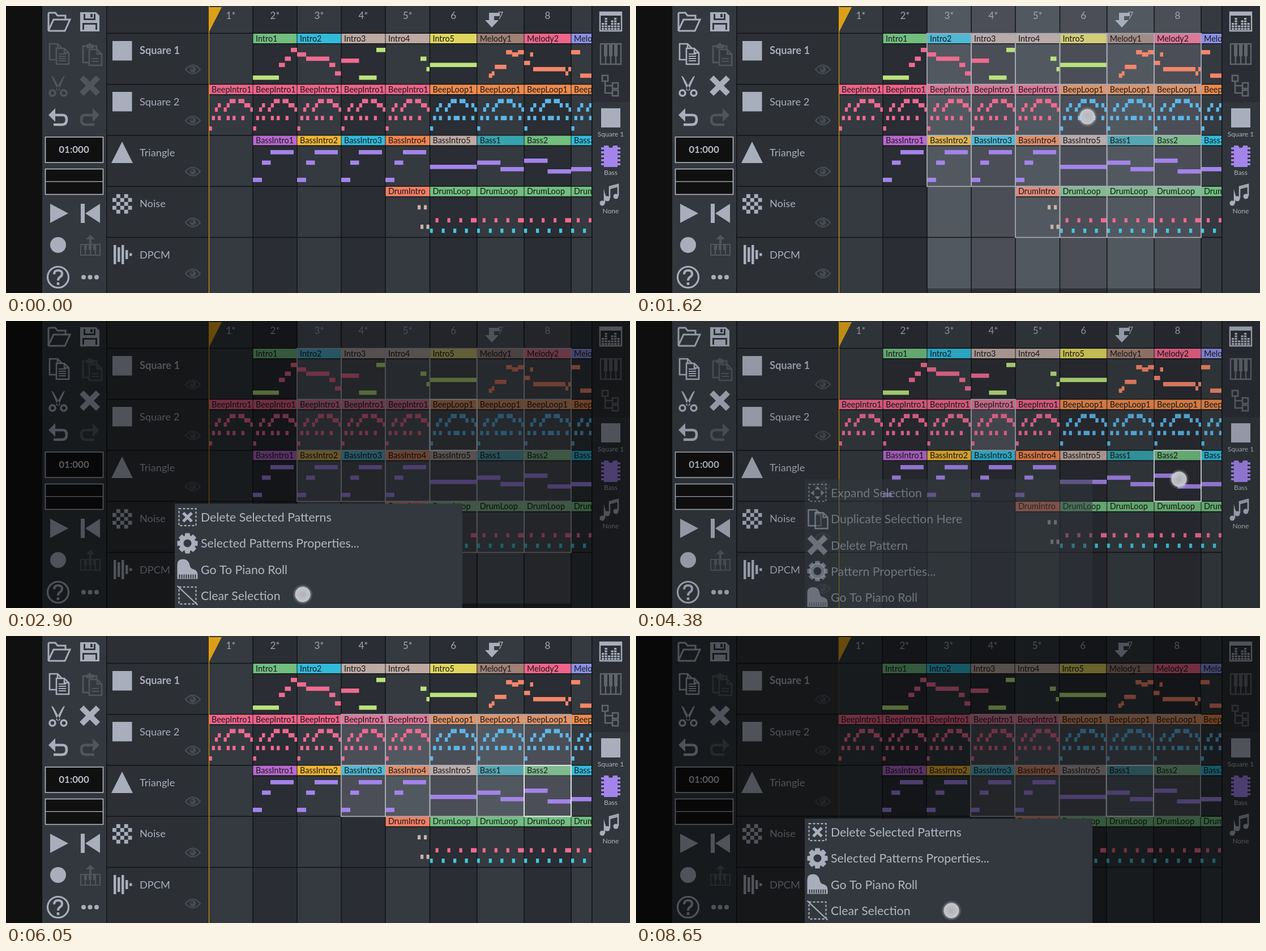
Animation, 1102 px wide and 508 px high, one loop 8720 ms. Source, as an HTML page with a canvas:

```html
<!DOCTYPE html>
<html lang="en">
<head>
<meta charset="utf-8">
<title>Pattern selection</title>
<style>
html, body { margin: 0; width: 100%; height: 100%; overflow: hidden; background: #101010; }
canvas { display: block; width: 1102px; height: 508px; }
</style>
</head>
<body>
<canvas id="stage" width="1102" height="508"></canvas>
<script>
const g = document.getElementById('stage').getContext('2d');
const LOOP = 8720, LIGHT = '#a9aebc', OFF = '#50555c', PANEL = '#32383e', LINE = '#111316';
const GREEN = '#71be7f', CYAN = '#31bbdb', MAUVE = '#bca9a1', ROSE = '#ef648a', ORANGE = '#ef8a4c';
const PINK = '#f06a91', LIME = '#b9e27c', CORAL = '#f4866a', BLUE = '#5ab8ec', PURPLE = '#a384ea';

const colX = [358, 436, 514, 592, 670, 748.5, 831.7, 915, 998, 1081];
const rowY = r => 48.3 + r * 90.3;
const clamp = v => Math.max(0, Math.min(1, v));
const smooth = v => v * v * (3 - 2 * v);

function rect(x, y, w, h, color) { g.fillStyle = color; g.fillRect(x, y, w, h); }
function fill(path, color) { g.fillStyle = color; g.fill(new Path2D(path)); }
function stroke(path, color, width = 2) { g.strokeStyle = color; g.lineWidth = width; g.stroke(new Path2D(path)); }
function disc(x, y, r, color) { g.fillStyle = color; g.beginPath(); g.arc(x, y, r, 0, 7); g.fill(); }
function text(s, x, y, size, color, weight = 400, align = 'left') {
  g.font = `${weight} ${size}px Lato, "Open Sans", sans-serif`;
  g.textAlign = align;
  g.textBaseline = 'alphabetic';
  g.fillStyle = color;
  g.fillText(s, x, y);
}
function at(x, y, draw) { g.save(); g.translate(x, y); draw(); g.restore(); }

// Notes are triples: x offset in the pattern, y on stage, width.
const beep = (lows, tail) => [
  [0, 213], ...lows.map(i => [i, 194.5]), [2, 179.5], [3, 172], [5, 179.5], [6, 172],
  [7, 164.5], [8, 164.5], [10, 164.5], [11, 164.5], [12, 172], [tail, 172], [tail + 1, 179.5],
].flatMap(([i, y]) => [i * 5.2 + .5, y, 5.3]);
const introBeep = ['BeepIntro1', ROSE, [PINK, beep([1, 3, 6, 8, 11], 13)]];
const loopBeep = ['BeepLoop1', ORANGE, [BLUE, beep([1, 3, 6, 8, 9, 11, 14], 14)]];
const introBass = (n, color) => ['BassIntro' + n, color, [PURPLE, [0, 304, 16, 16, 273.5, 15.5, 31, 255, 41]]];
const drums = ['DrumLoop', GREEN,
  [PINK, [10, 375.5, 5.2, 31, 375.5, 5.2, 52, 375.5, 5.2, 72.5, 375.5, 10.5]],
  ['#40c8e0', [0, 394, 5.2, 21, 394, 5.2, 41.5, 394, 5.2, 62, 394, 5.2]]];
const tracks = [
  ['Square 1', [null,
    ['Intro1', GREEN, [LIME, [0, 123, 46]], [PINK, [46, 100.5, 10.5, 56.5, 89.5, 10.5, 67, 74, 11]]],
    ['Intro2', CYAN, [PINK, [0, 82, 16, 16, 89.5, 41, 57, 100.5, 10.5, 67, 115.5, 10.5]]],
    ['Intro3', MAUVE, [PINK, [0, 93, 31.5]], [LIME, [31.5, 123, 31, 62, 74, 16]]],
    ['Intro4', MAUVE, [LIME, [62, 89.5, 10.5, 72.5, 108, 5.5]]],
    ['Intro5', '#e0d65e', [LIME, [0, 100.5, 83]]],
    ['Melody1', '#9f8075', [CORAL, [21, 119.5, 6, 26, 115.5, 5, 31.5, 104, 20.5, 51.5, 78, 10.5, 62, 82, 11, 72.5, 78, 10.5]]],
    ['Melody2', ROSE, [CORAL, [0, 97, 10.5, 10.5, 82, 5.5, 16, 108, 57, 73, 115.5, 5, 78, 108, 5]]],
    ['Melody3', '#8c90e6', [CORAL, [0, 78, 16, 16, 119.5, 40]]]]],
  ['Square 2', [...Array(5).fill(introBeep), ...Array(4).fill(loopBeep)]],
  ['Triangle', [null, introBass(1, '#b968d0'), introBass(2, '#efb532'), introBass(3, CYAN), introBass(4, '#f0844f'),
    ['BassIntro5', MAUVE, [PURPLE, [0, 281, 83]]],
    ['Bass1', '#38a3ad', [PURPLE, [0, 273.5, 41.5, 41.5, 285, 41.5]]],
    ['Bass2', GREEN, [PURPLE, [0, 270, 41.5, 41.5, 289, 41.5]]],
    ['Bass3', CYAN, [PURPLE, [0, 285, 60]]]]],
  ['Noise', [null, null, null, null,
    ['DrumIntro', '#ef7d62', ['#c8b3aa', [57, 352.5, 5.2, 68, 352.5, 5.2, 62, 387, 5.2, 72.5, 387, 5.2]]],
    drums, drums, drums, drums]],
  ['DPCM', []],
];

const cross = 'M-11 -18L0 -7 11 -18 18 -11 7 0 18 11 11 18 0 7 -11 18 -18 11 -7 0 -18 -11Z';
const piano = 'M-18 17V-8Q-18 -18 -8 -18Q2 -18 4 -7Q5 -1 11 0Q18 2 18 10V17Z';
const dashed = () => { g.setLineDash([4, 3]); stroke('M-15 -15H15V15H-15Z', LIGHT, 2.2); g.setLineDash([]); };
function page(x, y, color, back) {
  at(x, y, () => {
    fill('M-9 -13H5L13 -5V15H-9Z', back);
    stroke('M-9 -13H5L13 -5V15H-9ZM5 -13V-5H13', color, 2.6);
  });
}
function gear() {
  g.save();
  for (let i = 0; i < 8; i++) { fill('M-5 -12L-4 -18H4L5 -12Z', LIGHT); g.rotate(Math.PI / 4); }
  g.restore();
  g.strokeStyle = LIGHT; g.lineWidth = 7;
  g.beginPath(); g.arc(0, 0, 10.5, 0, 7); g.stroke();
}
const menuIcons = {
  'Expand Selection': () => {
    dashed();
    for (let i = 0; i < 4; i++) { fill('M0 -12L5 -6H-5Z', LIGHT); g.rotate(Math.PI / 2); }
  },
  'Duplicate Selection Here': () => { page(-7, -3, LIGHT, PANEL); page(5, 2, LIGHT, PANEL); },
  'Delete Pattern': () => fill(cross, LIGHT),
  'Pattern Properties...': gear,
  'Delete Selected Patterns': () => { dashed(); g.scale(.52, .52); fill(cross, LIGHT); },
  'Selected Patterns Properties...': gear,
  'Go To Piano Roll': () => {
    fill(piano, LIGHT);
    for (let x = -15; x < 17; x += 4) rect(x, 9, 2, 7, PANEL);
  },
  'Clear Selection': () => { dashed(); stroke('M-18 -17L18 17', LIGHT, 2.2); },
};
const groupItems = ['Delete Selected Patterns', 'Selected Patterns Properties...', 'Go To Piano Roll', 'Clear Selection'];
const cellItems = ['Expand Selection', 'Duplicate Selection Here', 'Delete Pattern', 'Pattern Properties...', 'Go To Piano Roll', 'Clear Selection'];

// Each menu: opening time, closing start and end, items.
const menus = [
  [2100, 3000, 3100, groupItems],
  [4265, 5920, 6050, cellItems],
  [7930, 9000, 9100, groupItems],
];
// Each touch: down, gone, x, y.
const touches = [
  [70, 1090, 553, 18], [1620, 2370, 797, 196], [2770, 3030, 524, 484], [3500, 3700, 630, 185],
  [3900, 4720, 959, 280], [5780, 5980, 540, 256], [7440, 8390, 888, 271], [8640, 8900, 557, 486],
];
const dragX = t => 553 + 404 * clamp((t - 70) / 820);

function selectionAt(t) {
  if (t < 90 || (t >= 3000 && t < 3700)) return null;
  if (t < 3000) return { c0: 2, c1: colX.findIndex(x => x > dragX(t)) - 1, r0: 0, r1: 4, full: true };
  return { c0: 3, c1: t < 5920 ? 3 : 7, r0: 1, r1: t < 5920 ? 1 : 2 };
}
function focusAt(t) {
  if (t >= 7930) return [6, 2];
  if (t >= 4265) return [7, 2];
  return t >= 2100 && t < 3000 ? [5, 1] : null;
}

function outline(c, r, color) {
  g.strokeStyle = color; g.lineWidth = 1.8;
  g.strokeRect(colX[c], rowY(r) + .2, colX[c + 1] - colX[c], 90.2);
}

function drawGrid(t) {
  const sel = selectionAt(t), focus = focusAt(t), veil = 'rgba(170,175,192,.25)';
  const selected = (c, r) => sel && c >= sel.c0 && c <= sel.c1 && r >= sel.r0 && r <= sel.r1;
  g.save();
  g.beginPath(); g.rect(357.5, 0, 676.5, 508); g.clip();
  g.translate(t >= 7930 ? -1 : 0, 0);
  for (let c = 0; c < 9; c++) {
    const x = colX[c], w = colX[c + 1] - x;
    rect(x, 0, w + 1, 508, c % 2 ? '#2a2d33' : '#343a3f');
    if (sel && sel.full && c >= sel.c0 && c <= sel.c1) rect(x, 0, w, 500, veil);
    if (c < 8) text(c + 1 + (c < 5 ? '*' : ''), x + w / 2, 23, 17, '#a0a5b1', 400, 'center');
  }
  colX.forEach(x => rect(x - .7, 0, 1.5, 508, LINE));
  for (let r = 0; r < 5; r++) rect(358, rowY(r) - .7, 680, 1.5, LINE);

  tracks.forEach(([, patterns], r) => patterns.forEach((p, c) => {
    if (!p) return;
    const x = colX[c], y = rowY(r), w = colX[c + 1] - x;
    rect(x + .5, y + .7, w - 1, 17, p[1]);
    rect(x, y + 17.7, w, 1.4, LINE);
    if (selected(c, r)) rect(x, y, w, sel.full ? 18 : 90, veil);
    g.save();
    g.beginPath(); g.rect(x, y, w, 90); g.clip();
    text(p[0], x + 5, y + 14.2, 14.4, '#17191c');
    for (const [color, notes] of p.slice(2))
      for (let i = 0; i < notes.length; i += 3) rect(x + notes[i], notes[i + 1], notes[i + 2], 7.6, color);
    g.restore();
  }));
  tracks.forEach(([, patterns], r) => patterns.forEach((p, c) => {
    if (p && selected(c, r)) outline(c, r, '#a9acb7');
  }));
  if (focus) outline(...focus, '#e8e9ec');

  fill('M872 12H853V25H846L858 38 870 25H862V18H872Z', LIGHT);
  rect(357.5, 0, 1.6, 508, '#dda018');
  fill('M358 2H381L358 47Z', '#dca018');
  g.restore();
}

function drawTracks() {
  rect(178, 0, 179.5, 508, '#2c3035');
  tracks.forEach(([name], r) => {
    const y = rowY(r);
    rect(178, y - .7, 179.5, 1.5, LINE);
    text(name, 236, y + 37, 18.2, LIGHT, r ? 400 : 700);
    at(330, y + 64, () => {
      stroke('M-13 0Q0 -15 13 0Q0 15 -13 0Z', '#464b51', 2.4);
      disc(0, 0, 5.5, '#464b51');
      disc(-1.5, -1.5, 2, '#2c3035');
    });
  });
  rect(188, 62, 34.5, 34.5, LIGHT);
  rect(188, 152, 34.5, 34.5, LIGHT);
  fill('M205 240L224 278H186Z', LIGHT);
  for (let i = 1; i < 25; i += 2) rect(188 + i % 5 * 6.9, 333 + Math.floor(i / 5) * 6.9, 6.9, 6.9, LIGHT);
  [34, 26, 34, 16, 5].forEach((h, i) => rect(190 + i * 7, 440 - h / 2, 4.5, h, LIGHT));
}

function drawToolbar(enabled) {
  const active = enabled ? LIGHT : OFF;
  rect(64, 0, 113, 508, PANEL);
  rect(177, 0, 1.5, 508, LINE);
  at(93, 28, () => {
    stroke('M-18 15V-14Q-18 -16 -16 -16H-6L-2 -11H12V-4', LIGHT, 3);
    stroke('M-18 15L-9 -4H20L11 16H-17Z', LIGHT, 3);
  });
  at(148, 28, () => {
    fill('M-17 -17H11L17 -11V17H-17Z', LIGHT);
    rect(-11, -14, 21, 11, PANEL); rect(-8, -17, 15, 11, LIGHT); rect(1, -14, 4, 6, PANEL);
    rect(-13, 2, 26, 12, PANEL); rect(-10, 5, 20, 12, LIGHT);
  });
  page(86, 80, active, PANEL);
  page(98, 88, active, PANEL);
  for (let i = 0; i < 4; i++) rect(93, 84 + i * 4, 13, 2, active);
  at(150, 85, () => {
    stroke('M-14 -14H10V15H-14Z', OFF, 3);
    fill('M-8 -17H-5Q-2 -23 1 -17H5V-10H-8Z', OFF);
    page(6, 5, OFF, PANEL);
    rect(1, 7, 13, 2, OFF); rect(1, 12, 13, 2, OFF);
  });
  at(92, 142, () => {
    fill('M-12 -18Q-9 -18 -7 -14L4 6 0 9ZM12 -18Q9 -18 7 -14L-4 6 0 9Z', active);
    stroke('M-15 12a5 5 0 1 0 10 0a5 5 0 1 0 -10 0M5 12a5 5 0 1 0 10 0a5 5 0 1 0 -10 0', active, 3.5);
  });
  at(148, 141, () => fill(cross, active));
  [[92, 1, LIGHT], [148, -1, OFF]].forEach(([x, flip, color]) => at(x, 197, () => {
    g.scale(flip, 1);
    stroke('M-8 -4H8Q15 -4 15 4Q15 13 7 13H-8', color, 4.5);
    fill('M-17 -4L-5 -16V8Z', color);
  }));
  g.strokeStyle = '#b4b8c3'; g.lineWidth = 1.6;
  for (const y of [232, 288.5]) { rect(69, y, 103, 45, '#101010'); g.strokeRect(69.5, y, 102, 45); }
  rect(70, 310, 101, 1.4, '#a4a8b3');
  text('01:000', 120, 260, 17, '#b9bdc8', 700, 'center');
  fill('M78 350L110 367 78 384Z', LIGHT);
  rect(132, 350, 7, 34, LIGHT);
  fill('M166 350V384L140 367Z', LIGHT);
  disc(92, 423, 14, LIGHT);
  at(149, 425, () => {
    stroke('M-17 -3H17V16H-17ZM-9 5V16M0 5V16M9 5V16', OFF, 2);
    [-11, -3, 5].forEach(x => rect(x, -3, 5, 10, OFF));
    rect(-2, -14, 4, 12, OFF);
    fill('M0 -20L8 -12H-8Z', OFF);
  });
  stroke('M73.5 480a18.5 18.5 0 1 0 37 0a18.5 18.5 0 1 0 -37 0', LIGHT, 3.2);
  stroke('M85 475Q85 468 92 468Q99 468 99 474Q99 478 95 480Q92 482 92 486', LIGHT, 4);
  disc(92, 491.5, 2.6, LIGHT);
  [137, 148.5, 160].forEach(x => disc(x, 480, 4, LIGHT));
}

function drawSide() {
  rect(1034, 0, 68, 508, '#30363b');
  rect(1034, 0, 68, 170, '#2a2e34');
  rect(1034, 0, 1.5, 508, LINE);
  at(1068, 28, () => {
    stroke('M-19 -17H19V16H-19Z', LIGHT, 2.4);
    rect(-19, -17, 38, 6, LIGHT);
    [3, 5, 2, 4, 5, 3].forEach((n, i) => {
      for (let k = 0; k < n; k++) rect(-16 + i * 5.5, 11 - k * 4.5, 4.2, 3.2, LIGHT);
    });
  });
  at(1068, 85, () => {
    stroke('M-18 -18H18V18H-18ZM-9 0V18M0 0V18M9 0V18', '#60656d', 2.4);
    [-12, -3, 6].forEach(x => rect(x, -18, 6, 22, '#60656d'));
  });
  at(1067, 141, () => stroke('M-14 -18H-4V-8H-14ZM-9 -8V13H4M-9 0H4M4 -5H14V5H4ZM4 8H14V18H4Z', '#60656d', 2.6));
  rect(1051, 181, 34, 34, LIGHT);
  at(1068, 266, () => {
    rect(-12, -19, 24, 38, PURPLE);
    for (let y = -16; y < 18; y += 7) rect(-17, y, 34, 4, PURPLE);
    disc(0, -19, 4, '#30363b');
  });
  at(1066, 334, () => {
    stroke('M0 6V-14L15 -18V2M0 -11L15 -15M-9 15V0Q-8 4 -4 6', LIGHT, 2.6);
    [[-4, 7], [11, 3], [-13, 15]].forEach(([x, y]) => disc(x, y, 4.5, LIGHT));
  });
  ['Square 1', 'Bass', 'None'].forEach((s, i) => text(s, 1068, [231, 299, 367][i], 12, '#b0b4bf', 400, 'center'));
}

function drawMenu(t) {
  for (const [start, close, end, items] of menus) {
    if (t < start || t >= end) continue;
    const shown = smooth(clamp((t - start) / 230)) * (1 - clamp((t - close) / (end - close)));
    rect(0, 0, 1102, 508, `rgba(0,0,0,${.53 * shown ** 2.1})`);
    const top = 508 - items.length * 46.2 + 100 * (1 - shown);
    g.globalAlpha = shown;
    rect(298, top, 508, 508, PANEL);
    items.forEach((item, i) => {
      const y = top + 24 + i * 46.2;
      at(320.5, y, menuIcons[item]);
      text(item, 344, y + 8, 21.3, '#b2b7c3');
    });
    g.globalAlpha = 1;
  }
}

function drawTouch(t) {
  touches.forEach(([down, gone, x, y], i) => {
    if (t < down || t >= gone) return;
    g.globalAlpha = clamp((gone - t) / 70);
    at(i ? x : dragX(t), y, () => {
      const halo = g.createRadialGradient(0, 0, 12, 0, 0, 18);
      halo.addColorStop(0, 'rgba(255,255,255,.4)');
      halo.addColorStop(1, 'rgba(255,255,255,0)');
      disc(0, 0, 18, halo);
      const body = g.createRadialGradient(0, 0, 2, 0, 0, 13.5);
      body.addColorStop(0, 'rgba(184,185,190,.9)');
      body.addColorStop(1, 'rgba(205,206,210,.9)');
      disc(0, 0, 13.5, body);
    });
    g.globalAlpha = 1;
  });
}

function frame(now) {
  const t = now % LOOP;
  rect(0, 0, 1102, 508, '#101010');
  drawGrid(t);
  drawTracks();
  drawToolbar(selectionAt(t));
  drawSide();
  drawMenu(t);
  drawTouch(t);
  requestAnimationFrame(frame);
}
frame(0);
</script>
</body>
</html>
```
